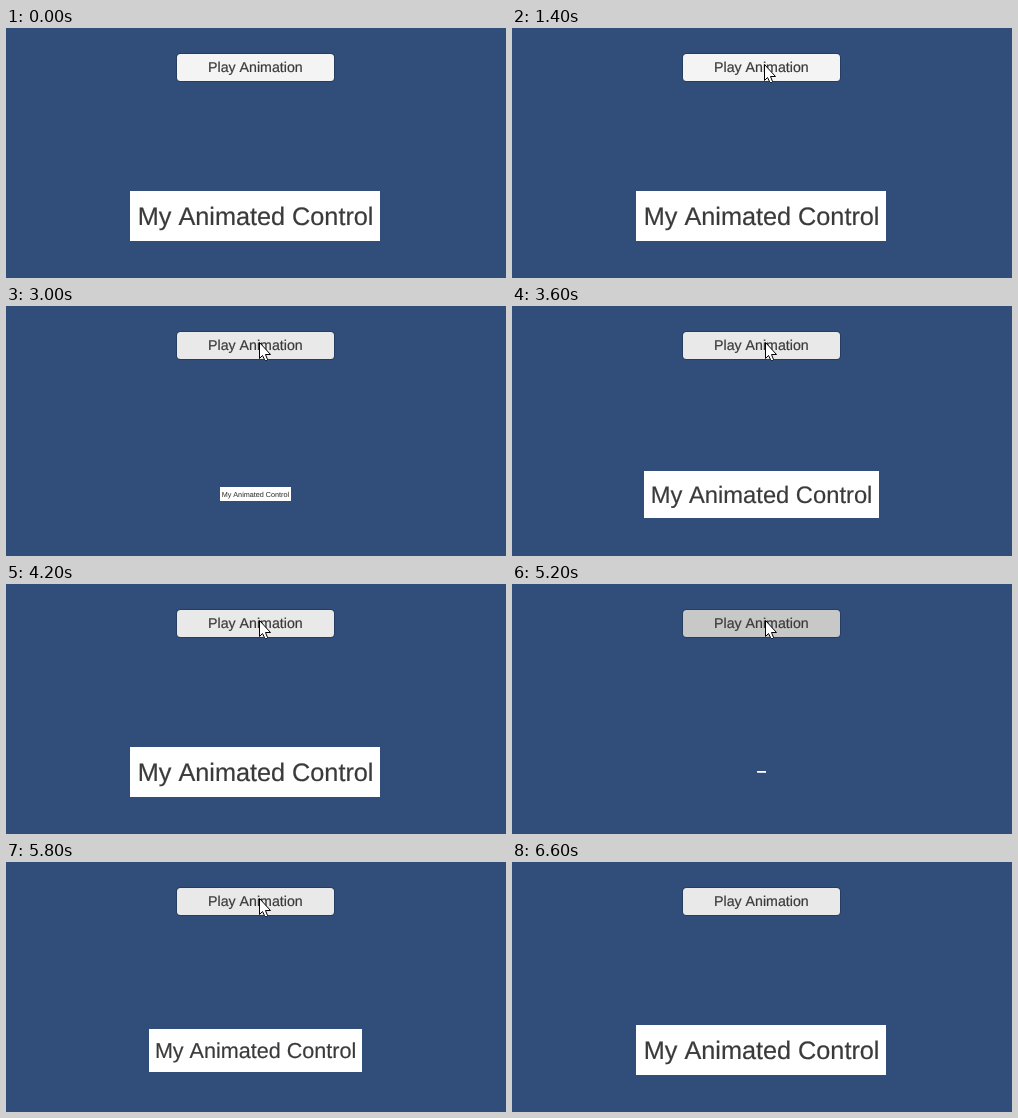
An HTML page for the animation above (7400 ms loop, 500x250 px).

```html
<!DOCTYPE html>
<html lang="en">
<head>
<meta charset="utf-8">
<title>Animated control</title>
<style>
  html, body { margin: 0; width: 100%; height: 100%; overflow: hidden; background: #314d79; }
  svg { display: block; width: 100%; height: 100%; }
  text {
    font-family: "Liberation Sans", Arial, sans-serif;
    font-kerning: none;
    text-anchor: middle;
    text-rendering: geometricPrecision;
    fill: #3a3a3a;
    stroke: #3a3a3a;
    stroke-width: .2;
  }
  #button { stroke: #263d62; stroke-width: 2; paint-order: stroke; }
</style>
</head>
<body>
<svg viewBox="0 0 500 250">
  <rect width="500" height="250" fill="#314d79"/>
  <rect id="button" x="171" y="26" width="157" height="27" rx="3.5"/>
  <text x="249.4" y="44.4" font-size="14.2">Play Animation</text>
  <g id="panel">
    <rect x="-125" y="-25" width="250" height="50" fill="#fff" shape-rendering="crispEdges"/>
    <text x=".3" y="9.1" font-size="25.25">My Animated Control</text>
  </g>
  <path id="cursor" d="M.5 .5V16.5L3.5 13.5L5.5 17.5L6.5 18.5H7.5L8.5 17.5L6.5 12.5H11.5Z" fill="#fff" stroke="#000" stroke-width="1"/>
</svg>
<script>
  const LOOP = 7400, STEP = 200, GROW = 1000;
  const CLICKS = [2845, 5182];

  // [from ms, x, y]
  const CURSOR = [
    [200, 268, 205], [400, 255, 69], [600, 250, 51], [800, 249, 41],
    [1000, 251, 37], [1200, 252, 36], [2800, 253, 36], [6400, 134, 53]
  ];
  const CURSOR_END = 6600;

  // [from ms, fill]
  const BUTTON = [[0, "#f4f4f4"], [3000, "#e9e9e9"], [5200, "#c8c8c8"], [5400, "#e9e9e9"]];

  const [button, panel, cursor] = ["button", "panel", "cursor"].map(id => document.getElementById(id));
  const latest = (keys, t) => keys.filter(k => k[0] <= t).pop();

  // Each click grows the panel from nothing with a quadratic ease-out.
  function panelScale(t) {
    const start = CLICKS.filter(c => c <= t).pop();
    if (start === undefined) return 1;
    const left = 1 - Math.min(1, (t - start) / GROW);
    return 1 - left * left;
  }

  function draw(ms) {
    const t = Math.floor((ms % LOOP) / STEP) * STEP;
    button.setAttribute("fill", latest(BUTTON, t)[1]);
    panel.setAttribute("transform", `translate(249.3 188.2) scale(${panelScale(t)})`);

    const at = t < CURSOR_END && latest(CURSOR, t);
    cursor.setAttribute("visibility", at ? "visible" : "hidden");
    if (at) cursor.setAttribute("transform", `translate(${at[1]} ${at[2]})`);
  }

  const began = performance.now();
  function tick() {
    draw(performance.now() - began);
    requestAnimationFrame(tick);
  }
  tick();
</script>
</body>
</html>
```
